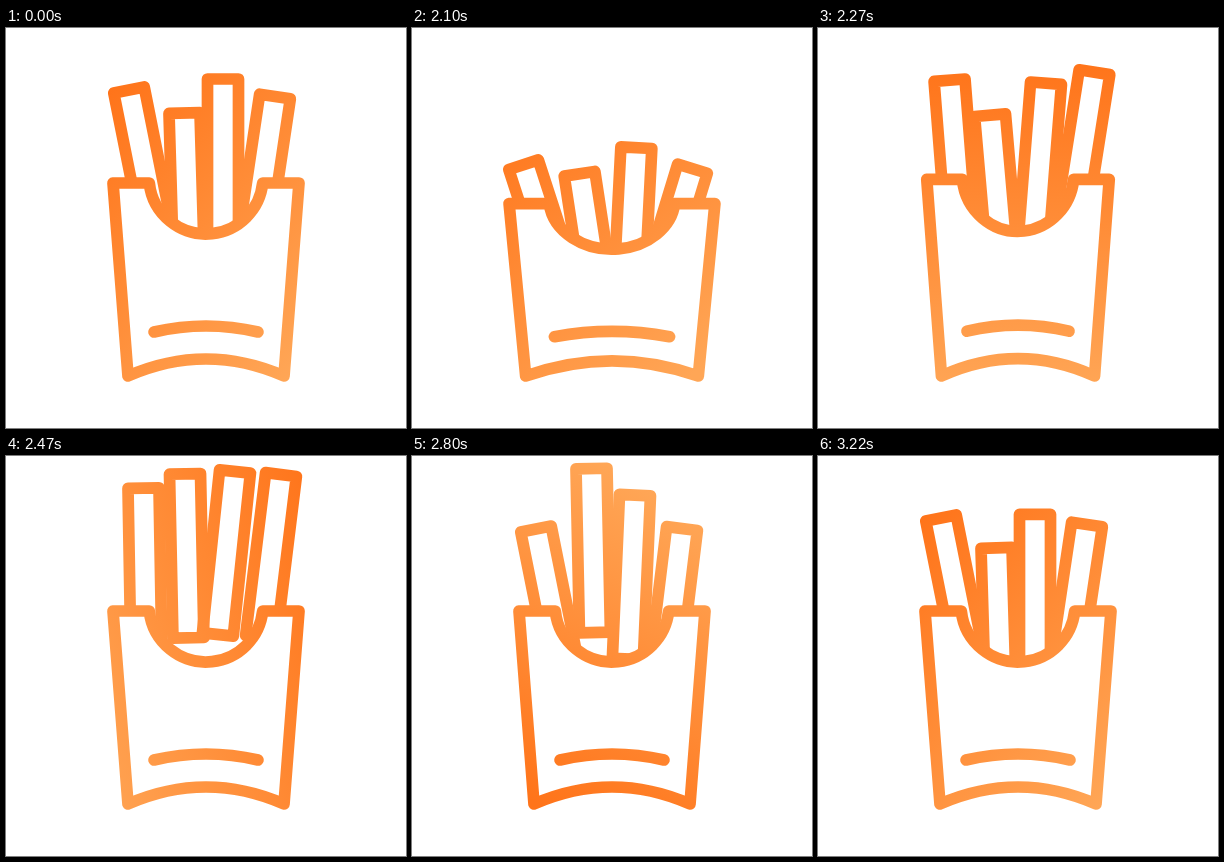
Recreate the animation shown at these times as an HTML page with a canvas. Size 400 px wide and 400 px high, loop 3.25 s.

```html
<!DOCTYPE html>
<html>
<head>
<meta charset="utf-8">
<style>
html, body { margin: 0; height: 100%; overflow: hidden; background: #fff; }
canvas { display: block; width: 400px; height: 400px; }
</style>
</head>
<body>
<canvas width="400" height="400"></canvas>
<script>
const ctx = document.querySelector('canvas').getContext('2d');
const LOOP = 3250, START = 2020;
const smooth = u => u * u * (3 - 2 * u);

// Monotone cubic through the keys, resting at both ends.
function track(times, values) {
  const last = times.length - 1;
  const slope = i => (values[i + 1] - values[i]) / (times[i + 1] - times[i]);
  const tangent = i => {
    if (i === 0 || i === last) return 0;
    const a = slope(i - 1), b = slope(i);
    return a * b > 0 ? 2 * a * b / (a + b) : 0;
  };
  return t => {
    if (t <= times[0]) return values[0];
    if (t >= times[last]) return values[last];
    const i = times.findIndex(k => k > t) - 1;
    const h = times[i + 1] - times[i], u = (t - times[i]) / h, s = smooth(u);
    return values[i] * (1 - s) + values[i + 1] * s
      + h * u * (1 - u) * ((1 - u) * tangent(i) - u * tangent(i + 1));
  };
}

const POSE = [1995, 2105, 2270, 2470, 2800, 3060];
const fry = (x, tilt, times, y) => ({
  x: track(POSE, x), tilt: track(POSE, tilt), y: track([1995, 2105, 2270, ...times], y)
});

const fries = [
  fry([123, 111.5, 131.5, 137.5, 124, 123], [-11.3, -18, -4.5, -1, -11.3, -11.3],
    [2400, 2470, 2800, 2860, 3060], [62, 137, 52.5, 30, 32, 73, 75, 62]),
  fry([178.5, 167.5, 172, 179, 179.5, 178.5], [-1.7, -8.7, -5, -1.2, -1.2, -1.7],
    [2470, 2620, 2800, 3110, 3220, 3250], [85, 146, 87.5, 18, 5, 12.5, 101, 92, 85]),
  fry([217, 224.5, 228, 229, 223, 217], [0, 3, 4.5, 6, 2.5, 0],
    [2470, 2540, 2800, 3070, 3220, 3250], [51, 120, 55.5, 15.5, 13, 39, 70, 58.5, 51]),
  fry([269, 280.5, 276.5, 275, 270, 269], [8.5, 17, 9, 7, 7, 8.5],
    [2410, 2470, 2800, 2860, 3060], [68.5, 141, 44.5, 16, 18.5, 72.5, 74, 68.5])
];
const squash = track([1995, 2105, 2265, 2410], [0, .107, -.019, 0]);

function gradient(t) {
  const turn = t < START ? 0 : smooth((t - 2000) / (LOOP - 2000));
  const angle = Math.PI * (1.25 + 2 * turn);
  const dx = 165 * Math.cos(angle), dy = 165 * Math.sin(angle);
  const g = ctx.createLinearGradient(200 + dx, 200 + dy, 200 - dx, 200 - dy);
  g.addColorStop(0, '#ff741a');
  g.addColorStop(1, '#ffa656');
  return g;
}

function drawFry({ x, y, tilt }, t) {
  ctx.save();
  ctx.translate(x(t), y(t));
  ctx.rotate(tilt(t) * Math.PI / 180);
  ctx.beginPath();
  ctx.rect(-15.5, 0, 31, 164);
  ctx.restore();
  ctx.stroke();
}

function drawBox(s) {
  const lip = Math.asin(6 / 57);
  ctx.save();
  ctx.translate(200, 348);
  ctx.scale(1 + s, 1 - s);
  ctx.translate(-200, -348);
  ctx.beginPath();
  ctx.moveTo(107, 155);
  ctx.arc(200, 149, 57, Math.PI - lip, lip, true);
  ctx.lineTo(293, 155);
  ctx.lineTo(278, 348);
  ctx.quadraticCurveTo(200, 314, 122, 348);
  ctx.closePath();
  ctx.fill();
  ctx.moveTo(148, 304);
  ctx.quadraticCurveTo(200, 292, 252, 304);
  ctx.restore();
  ctx.stroke();
}

function draw(now) {
  const loopTime = now % LOOP, t = loopTime < START ? 0 : loopTime;
  ctx.fillStyle = '#fff';
  ctx.fillRect(0, 0, 400, 400);
  ctx.strokeStyle = gradient(t);
  ctx.lineWidth = 11.7;
  ctx.lineCap = ctx.lineJoin = 'round';
  fries.forEach(f => drawFry(f, t));
  drawBox(squash(t));
  requestAnimationFrame(draw);
}
requestAnimationFrame(draw);
</script>
</body>
</html>
```
